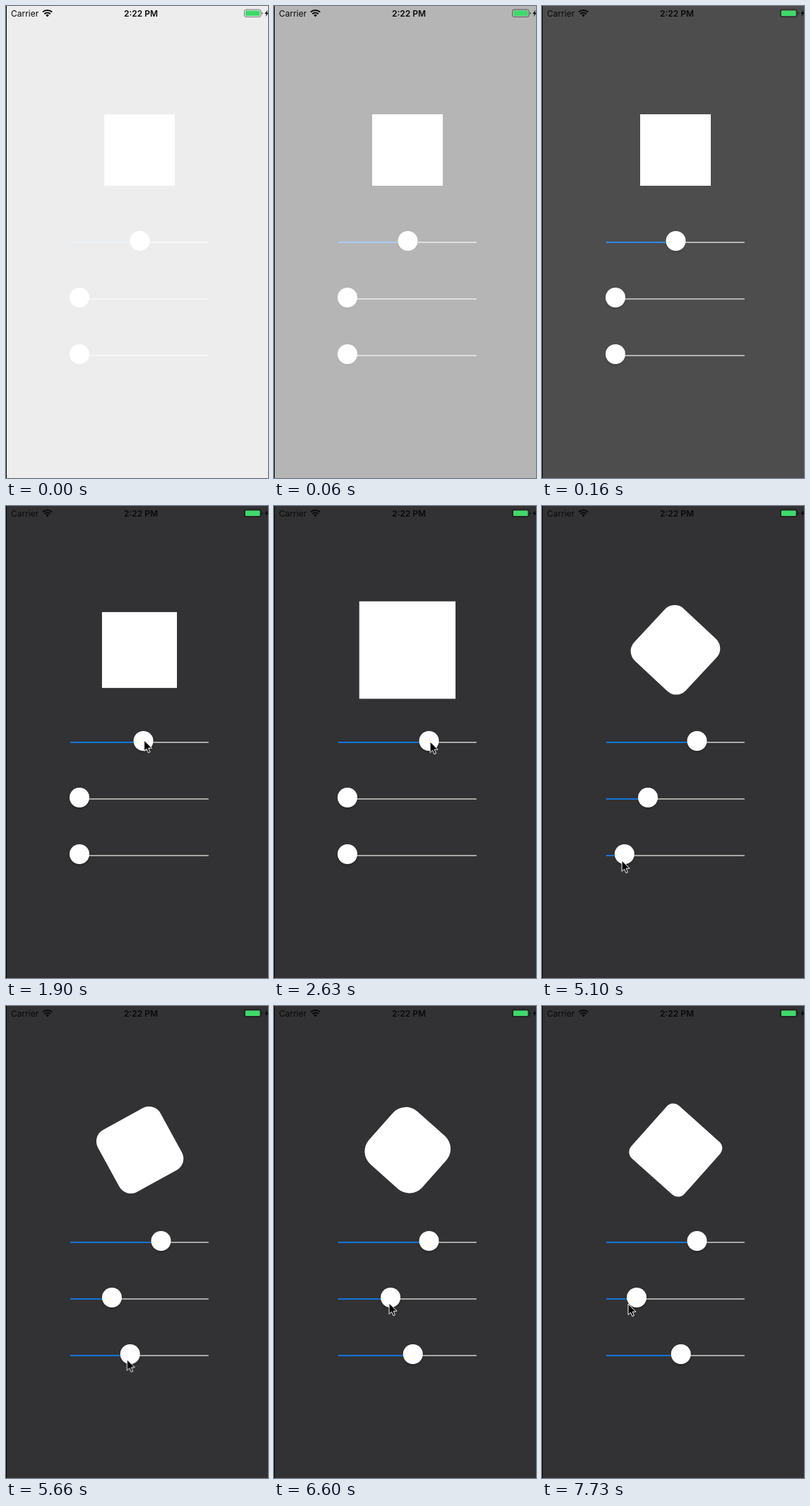
Write an HTML page that moves like this. It is 371 by 667 pixels and loops after 8000 ms.

```html
<!DOCTYPE html>
<html lang="en">
<head>
<meta charset="utf-8">
<title>Slider transforms</title>
<style>
/* Thumb centres in px; the square is derived from them. */
@property --size { syntax: "<number>"; inherits: true; initial-value: 189.5; }
@property --round { syntax: "<number>"; inherits: true; initial-value: 104; }
@property --turn { syntax: "<number>"; inherits: true; initial-value: 104; }
@property --scaled { syntax: "<number>"; inherits: true; initial-value: 1; }

html, body { margin: 0; width: 100%; height: 100%; overflow: hidden; background: #323234; }

.stage {
  position: relative; width: 371px; height: 667px; overflow: hidden;
  background: #323234;
  animation: size 8s linear infinite, round 8s linear infinite,
    turn 8s linear infinite, scaled 8s step-end infinite;
}
.stage > * { position: absolute; }

.square {
  left: 138.7px; top: 153.2px; width: 100.6px; height: 100.6px;
  background: #fff;
  border-radius: calc((var(--round) - 104) * .4035px);
  transform: rotate(calc((var(--turn) - 104) * 3.363deg))
    scale(calc(1 + var(--scaled) * (var(--size) - 189.5) * .0121));
}

.slider {
  left: 91px; width: 196px; height: 2.4px; border-radius: 2px;
  background: #a8a7a5;
}
.slider::before {
  content: ""; position: absolute; left: 0; top: 0; height: 100%;
  width: calc((var(--x) - 91) * 1px); border-radius: 2px; background: #1274dc;
}
.slider::after {
  content: ""; position: absolute; left: -14.2px; top: -15px;
  width: 28.4px; height: 28.4px; border-radius: 50%; background: #fff;
  transform: translateX(calc((var(--x) - 91) * 1px));
  box-shadow: 0 2px 3px rgba(0, 0, 0, .25);
}
.s1 { top: 332.8px; --x: var(--size); }
.s2 { top: 412.8px; --x: var(--round); }
.s3 { top: 492.8px; --x: var(--turn); }

.launch { inset: 0; background: #fff; animation: launch 8s linear infinite; }

.status { left: 0; top: 0; }
.status text { font: 12px Inter, Roboto, sans-serif; fill: #0a0a0a; }
.status .time { font-weight: 600; }

.cursor { left: -2px; top: -2px; animation: cursor 8s linear infinite; }
.edge { left: 0; top: 0; width: 1px; height: 100%; background: #000; }

@keyframes size {
  0%, 20.25% { --size: 189.5; }
  21.25% { --size: 191; }
  23.75% { --size: 194.5; }
  27% { --size: 208; }
  29.75%, 100% { --size: 219.5; }
}
@keyframes round {
  0%, 41.5% { --round: 104; }
  43.1% { --round: 118; }
  44.4%, 45.75% { --round: 123; }
  54.1%, 79% { --round: 150; }
  82.5% { --round: 165; }
  88% { --round: 188; animation-timing-function: ease-in-out; }
  95% { --round: 139; }
  96.6%, 100% { --round: 134; }
}
@keyframes turn {
  0%, 63.74% { --turn: 104; }
  63.75% { --turn: 116.7; }
  73.25%, 100% { --turn: 196.7; }
}
/* Rotating replaces the scale. */
@keyframes scaled {
  0% { --scaled: 1; }
  63.75%, 100% { --scaled: 0; }
}
@keyframes launch {
  0% { opacity: .92; }
  .625% { opacity: .7; }
  1.25% { opacity: .42; }
  2% { opacity: .13; }
  2.75% { opacity: .02; }
  3.75%, 100% { opacity: 0; }
}
@keyframes cursor {
  0%, 10.74% { transform: translate(400px, 640px); }
  10.75% { transform: translate(363px, 624px); animation-timing-function: ease-in-out; }
  18.5%, 20.25% { transform: translate(191px, 332px); }
  23.75% { transform: translate(195.5px, 331px); }
  27% { transform: translate(209px, 332px); }
  29.75%, 32.8% { transform: translate(221px, 333px); animation-timing-function: ease-in-out; }
  35% { transform: translate(248px, 352px); animation-timing-function: ease-in-out; }
  40.5%, 41.5% { transform: translate(97px, 415px); }
  43.1% { transform: translate(110px, 415px); }
  44.4%, 45.75% { transform: translate(115px, 416px); }
  54.1%, 56.2% { transform: translate(144px, 417px); animation-timing-function: ease-in-out; }
  62%, 63.74% { transform: translate(109px, 501px); }
  63.75% { transform: translate(113px, 501px); }
  73.25%, 74.4% { transform: translate(192px, 499px); animation-timing-function: ease-in-out; }
  78.5%, 79% { transform: translate(149px, 420px); }
  82.5% { transform: translate(163px, 420px); }
  88% { transform: translate(183px, 420px); animation-timing-function: ease-in-out; }
  95% { transform: translate(127px, 420px); }
  96.6%, 100% { transform: translate(122px, 421px); }
}
</style>
</head>
<body>
<div class="stage">
  <div class="square"></div>
  <div class="slider s1"></div>
  <div class="slider s2"></div>
  <div class="slider s3"></div>
  <div class="launch"></div>
  <svg class="status" width="371" height="22">
    <text x="7" y="14.6">Carrier</text>
    <text class="time" x="191" y="14.6" text-anchor="middle">2:22 PM</text>
    <g fill="none" stroke="#0a0a0a" stroke-width="2">
      <path d="M52 8.6a9.6 9.6 0 0 1 13.2 0"/>
      <path d="M54.4 11.2a6 6 0 0 1 8.4 0"/>
    </g>
    <path d="M56.3 12.9a3.4 3.4 0 0 1 4.6 0L58.6 15.4Z" fill="#0a0a0a"/>
    <rect x="337.5" y="5" width="23.5" height="10.5" rx="2.5" fill="none" stroke="#000" stroke-opacity=".5"/>
    <rect x="339" y="6.5" width="20.5" height="7.5" rx="1.2" fill="#3ddb69"/>
    <path d="M362.2 8.4q1.5.5 1.5 1.9t-1.5 1.9Z" fill="#000" fill-opacity=".5"/>
    <path d="M370.5 5.5L366.2 10.9H368.8L367.6 15L372 9.5H369.4Z" fill="#0a0a0a"/>
  </svg>
  <svg class="cursor" width="16" height="23" viewBox="-2 -2 16 23">
    <path d="M0 0V15.4L3.5 12.1L5.9 17.6L8.4 16.5L6.1 11.1H11Z" fill="#000" stroke="#fff" stroke-linejoin="round"/>
  </svg>
  <div class="edge"></div>
</div>
</body>
</html>
```
